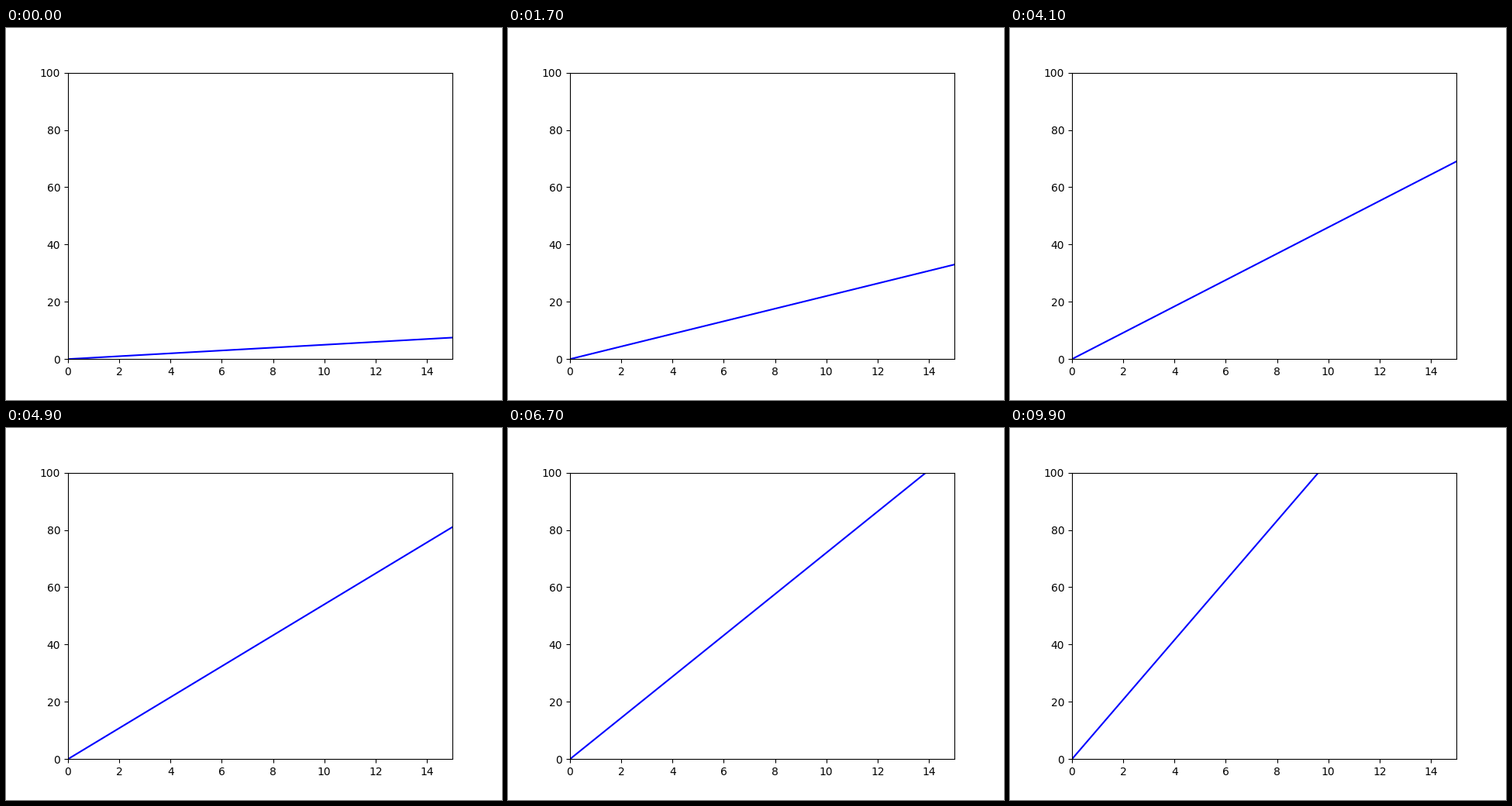
Animation, 640 px wide and 480 px high, one loop 10000 ms. Source, as a matplotlib script:

```python
import matplotlib.pyplot as plt
import numpy as np
from matplotlib.animation import FuncAnimation

FRAMES = 100
INTERVAL = 100  # ms

fig, ax = plt.subplots(figsize=(6.4, 4.8), dpi=100)
ax.set_xlim(0, 15)
ax.set_ylim(0, 100)

x = np.linspace(0, 15, 16)
line, = ax.plot(x, 0.5 * x, color="blue", linewidth=1.5)


def update(i):
    """Steepen the line by 0.1 per step."""
    slope = 0.5 + 0.1 * i
    line.set_ydata(slope * x)
    return line,


anim = FuncAnimation(fig, update, frames=FRAMES, interval=INTERVAL,
                     repeat=True, repeat_delay=0)
plt.show()
```
